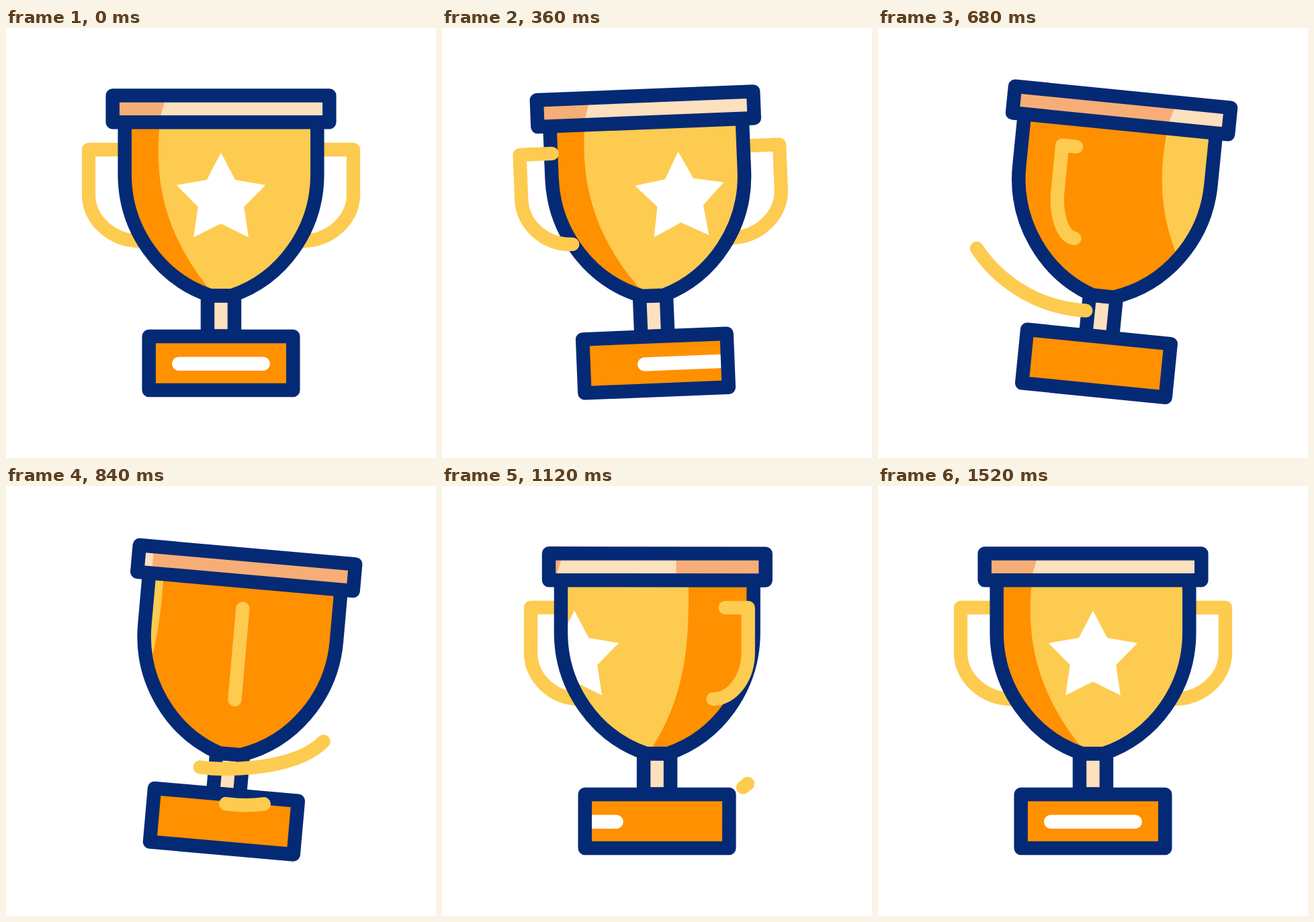
These frames come from a looping animation (640 by 640 pixels, 1.8 s). An HTML page:

```html
<!DOCTYPE html>
<html lang="en">
<head>
<meta charset="utf-8">
<title>Spinning trophy</title>
<style>
  html, body { margin: 0; width: 100%; height: 100%; overflow: hidden; background: #fff; }
  svg { display: block; width: 100%; height: 100%; }
  .navy { stroke: #042a76; stroke-width: 20.5; stroke-linejoin: round; fill: none; }
  .gold { stroke: #fdcb50; stroke-width: 20.3; stroke-linejoin: round; stroke-linecap: round; fill: none; }
  .light { fill: #fdcb50; }
  .dark { fill: #ff9000; }
  .rimLight { fill: #fde0be; }
  .rimDark { fill: #f7ae76; }
  .white { fill: #fff; }
</style>
</head>
<body>
<svg viewBox="0 0 640 640">
  <defs>
    <path id="cup" d="M176.7 145V218C176.7 300 229 373 304 398.3H336C411 373 463.3 300 463.3 218V145"/>
    <rect id="rim" x="158.7" y="100.5" width="322.6" height="39.8"/>
    <rect id="base" x="212.7" y="459" width="214.6" height="80"/>
    <clipPath id="inCup"><use href="#cup"/></clipPath>
    <clipPath id="inRim"><use href="#rim"/></clipPath>
    <clipPath id="inBase"><use href="#base"/></clipPath>
  </defs>
  <g id="trophy">
    <path id="back" class="gold"/>
    <path id="sideBack" class="gold"/>

    <rect class="navy" x="300" y="398.5" width="40" height="60" style="fill:#fde0be"/>

    <g clip-path="url(#inCup)">
      <use href="#cup" class="light"/>
      <path class="dark shadeL" d="M229 140C222 215 228 295 302 388L312 400H-300V140Z"/>
      <path class="dark shadeR" d="M489.5 140C491 220 488 290 451 363L430 400H1000V140Z"/>
      <path id="star" class="white slide"/>
    </g>
    <use href="#cup" class="navy"/>

    <g clip-path="url(#inRim)">
      <use href="#rim" class="rimLight"/>
      <path class="rimDark shadeL" d="M239 100L227 141H-300V100Z"/>
      <path class="rimDark shadeR" d="M471.5 100V141H1000V100Z"/>
    </g>
    <use href="#rim" class="navy"/>

    <g clip-path="url(#inBase)">
      <use href="#base" class="dark"/>
      <rect class="white slide" x="247" y="489.5" width="146" height="20.5" rx="10.25"/>
    </g>
    <use href="#base" class="navy"/>

    <path id="sideFront" class="gold"/>
  </g>
  <path id="streakA" class="gold" pathLength="100"
        d="M147 328C175 371 235 421 322 421C405 421 490 402 494 332"/>
  <path id="streakB" class="gold" pathLength="100" d="M327 473C370 479 420 473 455 443"/>
</svg>
<script>
const LOOP = 1800, STEP = 40;
const SPAN = 403;   // distance the star travels in one turn
const $ = id => document.getElementById(id);

// Progress of t from a to b, linear or eased at both ends.
const part = (t, a, b) => Math.min(1, Math.max(0, (t - a) / (b - a)));
const ease = (t, a, b) => { const u = part(t, a, b); return u * u * (3 - 2 * u); };

// Side view of a handle: full width when |k| = 1, edge-on when k = 0.
function handle(k) {
  const x = d => (320 + k * d).toFixed(2);
  return `M${x(147)} 181H${x(197)}V248C${x(197)} 286 ${x(162)} 317 ${x(121)} 317`;
}

function starPath(cx, cy, outer, inner) {
  const pts = Array.from({ length: 10 }, (_, i) => {
    const r = i % 2 ? inner : outer, a = i * Math.PI / 5;
    return [cx + r * Math.sin(a), cy - r * Math.cos(a)];
  });
  return 'M' + pts.join('L') + 'Z';
}

function shift(cls, x) {
  for (const el of document.querySelectorAll('.' + cls))
    el.setAttribute('transform', `translate(${x.toFixed(2)} 0)`);
}

function streak(id, tail, head) {
  const el = $(id), len = 100 * (head - tail);
  el.style.display = len > .3 ? '' : 'none';
  el.setAttribute('stroke-dasharray', `${Math.max(len, 0)} 300`);
  el.setAttribute('stroke-dashoffset', -100 * tail);
}

function draw(t) {
  const tilt = -5.1 * ease(t, 0, 240) + 10.8 * ease(t, 240, 600) - 5.7 * ease(t, 760, 1140);
  $('trophy').setAttribute('transform', `rotate(${tilt.toFixed(3)} 320 549)`);

  // The light face leaves to the right, then comes back in from the left.
  const entering = t >= 800;
  const slideIn = SPAN * (ease(t, 500, 1480) - 1);
  shift('slide', entering ? slideIn : SPAN * ease(t, 200, 960));
  shift('shadeR', entering ? slideIn : 0);
  shift('shadeL', entering ? slideIn * .48 : SPAN * ease(t, 220, 1194) - 23 * ease(t, 0, 220));

  // Handles turn at a steady rate, half a circle each.
  const turn = part(t, 260, 1420), inFront = turn > 0 && turn < 1;
  const side = handle(-Math.cos(Math.PI * turn));
  $('sideFront').setAttribute('d', inFront ? side : '');
  $('sideBack').setAttribute('d', inFront ? '' : side);
  $('back').setAttribute('d', handle(Math.cos(Math.PI * part(t, 360, 1200))));

  streak('streakA', part(t, 700, 1040), part(t, 500, 890));
  streak('streakB', part(t, 840, 1140), part(t, 760, 950));
}

$('star').setAttribute('d', starPath(320, 255.2, 69.6, 36));

const start = performance.now();
function tick() {
  const t = (performance.now() - start) % LOOP;
  draw(Math.floor(t / STEP) * STEP);
  requestAnimationFrame(tick);
}
tick();
</script>
</body>
</html>
```
